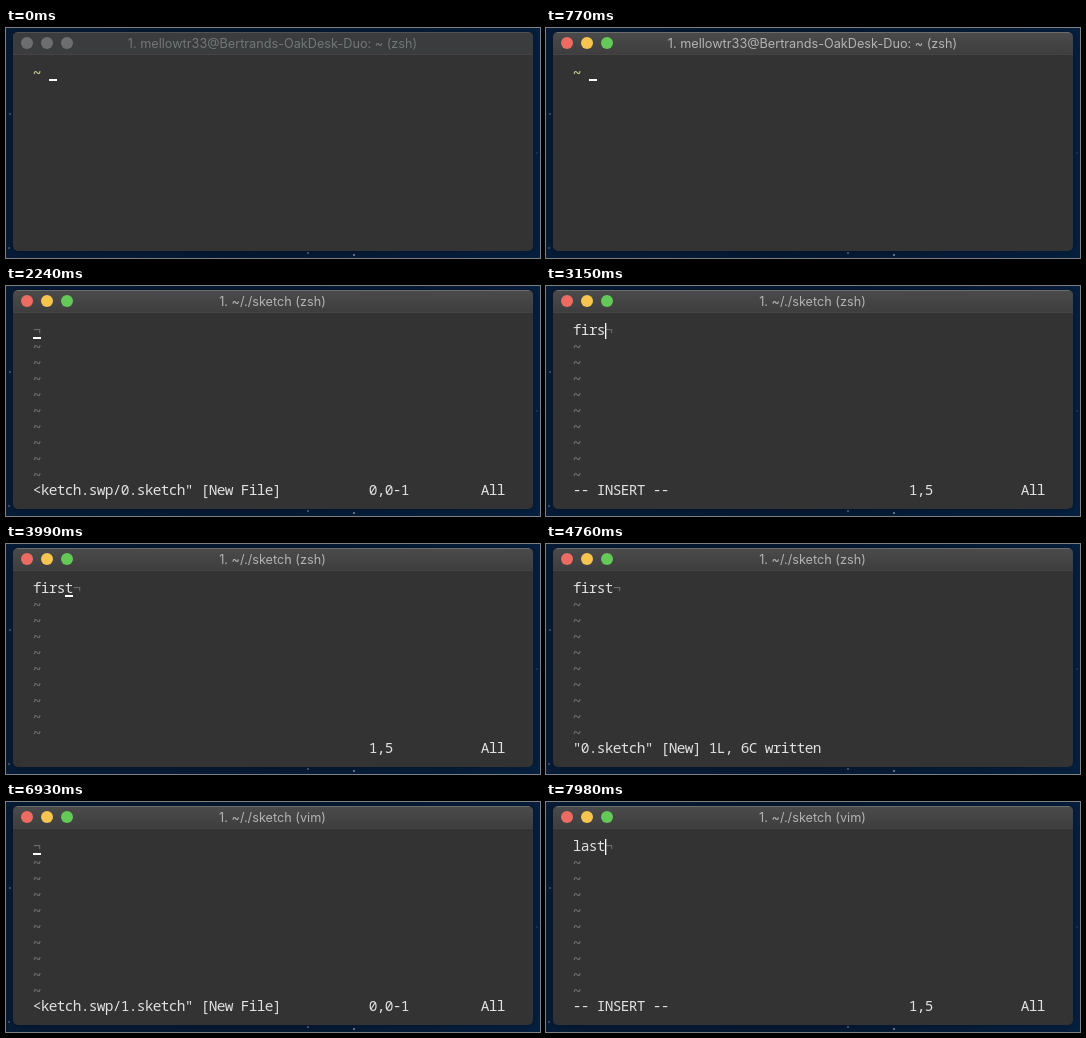
An HTML page for the animation above (8000 ms loop, 534 px wide and 230 px high).

```html
<!DOCTYPE html>
<html lang="en">
<head>
<meta charset="utf-8">
<title>Terminal sketch</title>
<style>
  html, body { margin: 0; width: 100%; height: 100%; overflow: hidden; background: #06162c; }
  svg { display: block; width: 534px; height: 230px; }
  #title { font: 400 12.7px Inter, Roboto, sans-serif; text-anchor: middle; }
  #screen text { font: 400 14.5px "Noto Sans Mono", "DejaVu Sans Mono", monospace; letter-spacing: -.7px; white-space: pre; }
  #screen .tilde { font-weight: 600; }
</style>
</head>
<body>
<svg viewBox="0 0 534 230" xmlns="http://www.w3.org/2000/svg">
  <defs>
    <linearGradient id="sky" x2="1" y2="0">
      <stop offset="0" stop-color="#071c38"/>
      <stop offset=".5" stop-color="#061a34"/>
      <stop offset="1" stop-color="#062040"/>
    </linearGradient>
    <linearGradient id="bar" x2="0" y2="1">
      <stop offset="0" stop-color="#4b4b4c"/>
      <stop offset="1" stop-color="#3e3e3f"/>
    </linearGradient>
    <filter id="soft" x="-10%" y="-10%" width="120%" height="120%"><feGaussianBlur stdDeviation="4"/></filter>
  </defs>
  <rect width="534" height="230" fill="url(#sky)"/>
  <rect x="6" y="2" width="522" height="222" rx="6" fill="#000" opacity=".25" filter="url(#soft)"/>
  <g id="stars"></g>
  <rect x="7" y="4" width="520" height="219" rx="5" fill="#333334"/>
  <path d="M7 26V9a5 5 0 0 1 5-5H522a5 5 0 0 1 5 5V26Z" fill="url(#bar)"/>
  <path d="M11 4.5H523" stroke="#6c6c6d"/>
  <g id="lights"></g>
  <g id="idle">
    <path d="M7 26V9a5 5 0 0 1 5-5H522a5 5 0 0 1 5 5V26Z" fill="#3b3c3d"/>
    <path d="M11 4.5H523" stroke="#515253"/>
  </g>
  <path d="M7 26.5H527" stroke="#474345"/>
  <text id="title" x="266.5" y="20"></text>
  <g id="screen"></g>
  <rect id="cursor" fill="#fff"/>
</svg>
<script>
const LOOP = 8000, LEFT = 27, TOP = 37, CELL_W = 8, CELL_H = 16;
const TEXT = '#e0e0e0', DIM = '#707071', PROMPT = '#cfcf8e';
const $ = id => document.getElementById(id);

function add(parent, tag, attrs, text) {
  const el = document.createElementNS('http://www.w3.org/2000/svg', tag);
  for (const key in attrs) el.setAttribute(key, attrs[key]);
  if (text) el.textContent = text;
  parent.append(el);
  return el;
}

[[3, 220, .5], [302, 225, .6], [348, 227, .95], [4, 86, .5], [531, 125, .2]]
  .forEach(([cx, cy, opacity]) => add($('stars'), 'circle', { cx, cy, r: .8, fill: '#dfe8f5', opacity }));

['#ee6b62', '#f6c44f', '#63c957'].forEach((fill, i) => {
  const spot = { cx: 21 + 20 * i, cy: 15, r: 6 };
  add($('lights'), 'circle', { ...spot, fill });
  add($('idle'), 'circle', { ...spot, fill: '#6d6e6f' });
});

const HOME = '1. mellowtr33@Bertrands-OakDesk-Duo: ~ (zsh)';
const ZSH = '1. ~/./sketch (zsh)', VIM = '1. ~/./sketch (vim)';

// A view is a list of [column, row, text, colour] plus a cursor [column, row, shape].
function shell(lines, cursor, title = HOME, idle = 0) {
  const cells = [];
  lines.forEach((line, row) => {
    cells.push([0, row, '~', PROMPT]);
    if (line) cells.push([2, row, line, TEXT]);
  });
  return { title, idle, cells, cursor };
}

function editor(title, text, status, ruler, cursor) {
  const cells = [[text.length, 0, '¬', DIM], [0, 10, status, TEXT]];
  if (text) cells.push([0, 0, text, TEXT]);
  for (let row = 1; row < 10; row++) cells.push([0, row, '~', DIM]);
  if (ruler) cells.push([42, 10, ruler, TEXT], [56, 10, 'All', TEXT]);
  return { title, idle: 0, cells, cursor };
}

const opened = (title, n) => editor(title, '', `<ketch.swp/${n}.sketch" [New File]`, '0,0-1', [0, 0]);
const insert = (title, text) =>
  editor(title, text, '-- INSERT --', `${text ? 1 : 0},${text.length + 1}`, [text.length, 0, 'bar']);
const command = line => editor(ZSH, 'first', line, '1,5', line ? [line.length, 10] : [4, 0]);
const typing = (title, word, times) => times.map((t, i) => [t, insert(title, word.slice(0, i))]);

const steps = [
  [0, shell([''], [2, 0], HOME, 1)],
  [70, shell([''], [2, 0], HOME, .5)],
  [140, shell([''], [2, 0])],
  [1470, shell(['s'], [3, 0])],
  [1750, shell(['s'], [0, 1])],
  [1820, opened(HOME, 0)],
  [1960, opened(ZSH, 0)],
  ...typing(ZSH, 'first', [2520, 2660, 2800, 2940, 3080, 3290]),
  [3710, command('')],
  [4130, command(':')],
  [4200, command(':w')],
  [4340, command(':wq')],
  [4690, editor(ZSH, 'first', '"0.sketch" [New] 1L, 6C written')],
  [4830, shell(['s', ''], [2, 1])],
  [5740, shell(['s', ''])],
  [5810, shell(['s', 's'], [3, 1])],
  [6090, shell(['s', 's'], [0, 2])],
  [6160, opened(HOME, 1)],
  [6300, opened(ZSH, 1)],
  [6790, opened(VIM, 1)],
  ...typing(VIM, 'last', [7070, 7280, 7420, 7560, 7700])
];

function draw({ title, idle, cells, cursor }) {
  $('title').textContent = title;
  $('title').setAttribute('fill', idle > .5 ? '#72777a' : '#b3b3b4');
  $('idle').setAttribute('opacity', idle);
  $('screen').replaceChildren();
  for (const [col, row, text, fill] of cells) {
    const tilde = text === '~';
    const x = LEFT + col * CELL_W - .3, y = TOP + row * CELL_H + (tilde ? 13 : 12);
    add($('screen'), 'text', { x, y, fill, class: tilde ? 'tilde' : 'plain' }, text);
  }

  const mark = $('cursor');
  mark.setAttribute('visibility', cursor ? 'visible' : 'hidden');
  if (!cursor) return;
  const [col, row, shape] = cursor, bar = shape === 'bar';
  const box = {
    x: LEFT + col * CELL_W,
    y: TOP + row * CELL_H + (bar ? 0 : 14),
    width: bar ? 1.3 : CELL_W,
    height: bar ? CELL_H : 2
  };
  for (const key in box) mark.setAttribute(key, box[key]);
}

let shown;
const start = performance.now();
function tick() {
  const t = (performance.now() - start) % LOOP;
  const step = steps.findLast(([at]) => at <= t);
  if (step !== shown) draw((shown = step)[1]);
  requestAnimationFrame(tick);
}
tick();
</script>
</body>
</html>
```
